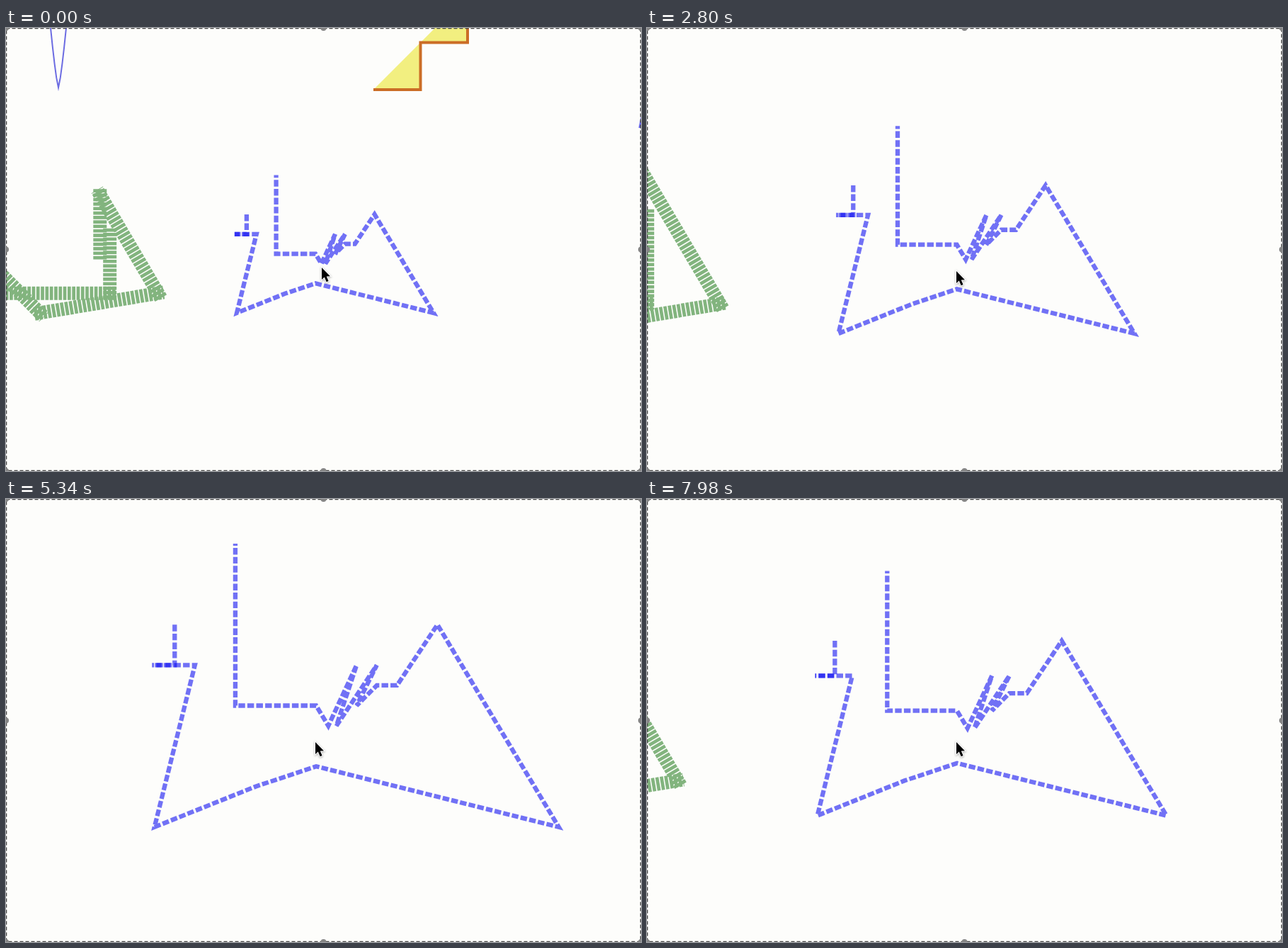
An HTML page with a canvas for the animation above (8000 ms loop, 897x625 px).

```html
<!DOCTYPE html>
<html>
<head>
<meta charset="utf-8">
<style>
html, body { margin: 0; width: 100%; height: 100%; overflow: hidden; background: #fdfdfb; }
canvas { display: block; }
</style>
</head>
<body>
<canvas id="stage" width="897" height="625"></canvas>
<script>
const W = 897, H = 625, LOOP = 8000;
const ctx = document.getElementById('stage').getContext('2d');
const center = { x: 436.3, y: 344.3 };

// Size of one map unit in pixels: [ms, size]
const UNIT = 13.9;
const zoomKeys = [
  [840, UNIT], [2260, 18.35], [3380, 23.65], [4360, 24.3], [5340, 28.55], [6460, 31.4], [7980, 24.65]
];

// Lines in map units; the blue one doubles back where its two parts meet
const blueStart = [[1, 10], [1, 8], [0, 8]];
const blueRest = [
  [0, 8], [2, 8], [0, 0], [5, 2], [8, 3], [20, 0], [14, 10], [12, 7], [11, 7],
  [10, 6], [11, 8], [9, 5], [10, 8], [8.6, 5], [8, 6], [4, 6], [4, 14]
];
const greenLines = [
  [[-25, 5], [-20, 0], [-8, 2], [-13.9, 12], [-13.9, 6]],
  [[-12.9, 8], [-12.9, 2], [-25, 2]]
];

let scale = 1;

function sample(keys, t) {
  const next = keys.findIndex(key => key[0] >= t);
  if (next < 1) return next ? keys.at(-1)[1] : keys[0][1];
  const [t0, a] = keys[next - 1], [t1, b] = keys[next];
  return a + (b - a) * (t - t0) / (t1 - t0);
}

// Unzoomed pixels to screen, and map units to screen
const zoom = (x, y) => [center.x + (x - center.x) * scale, center.y + (y - center.y) * scale];
const fromMap = ([x, y]) => zoom(326 + x * UNIT, 402 - y * UNIT);

function trace(points) {
  ctx.beginPath();
  points.forEach(p => ctx.lineTo(...p));
}

function stroke(points, color, width, dash = [], offset = 0) {
  trace(points);
  ctx.strokeStyle = color;
  ctx.lineWidth = width;
  ctx.setLineDash(dash);
  ctx.lineDashOffset = offset;
  ctx.stroke();
}

function extend(a, b, by) {
  const angle = Math.atan2(b[1] - a[1], b[0] - a[0]);
  const dx = by * Math.cos(angle), dy = by * Math.sin(angle);
  return [[a[0] - dx, a[1] - dy], [b[0] + dx, b[1] + dy]];
}

function drawGreen() {
  for (const line of greenLines) {
    const points = line.map(fromMap);
    for (let i = 1; i < points.length; i++) {
      stroke(extend(points[i - 1], points[i], 8), 'rgb(130,180,126)', 19, [4.7, 1.6]);
    }
  }
}

// Two strokes, so that the doubled part darkens
function drawBlue() {
  const color = 'rgba(4,4,240,0.56)', width = 6.3, dash = [9.45, 3.15];
  const start = blueStart.map(fromMap), rest = blueRest.map(fromMap);
  const reach = width / 2;
  start.at(-1)[0] -= reach;
  rest[0][0] -= reach;
  ctx.miterLimit = 3;
  stroke(start, color, width, dash);
  stroke(rest, color, width, dash, 3 * UNIT * scale - reach);
}

function drawStairs() {
  const step = 66.5;
  const at = (i, j) => zoom(519 + i * step, 87 - j * step);
  const stairs = [];
  for (let i = 0; i < 3; i++) {
    trace([at(i, i), at(i + 1, i), at(i + 1, i + 1)]);
    ctx.fillStyle = '#f2ef80';
    ctx.fill();
    stairs.push(at(i, i), at(i + 1, i));
  }
  stroke(stairs, '#cb6d26', 4);
}

function drawCurve() {
  const points = [];
  for (let d = -1; d <= 1; d += 0.25) {
    points.push(zoom(74 + 11 * d, 84 * (1 - Math.abs(d) ** 1.3)));
  }
  stroke(points, '#6c6ce2', 2);
  stroke([zoom(899, 122), zoom(895, 141)], '#6c6cf0', 3);
}

function drawFrame() {
  ctx.strokeStyle = '#4a4a4a';
  ctx.lineWidth = 1.5;
  ctx.lineDashOffset = 0;
  ctx.setLineDash([5, 3]);
  ctx.strokeRect(0.5, 0.5, W - 1, H - 1);
  ctx.fillStyle = '#858585';
  for (const x of [0, W / 2, W]) {
    for (const y of [0, H / 2, H]) {
      if (x === W / 2 && y === H / 2) continue;
      ctx.beginPath();
      ctx.arc(x, y, 4, 0, 7);
      ctx.fill();
    }
  }
}

function drawPointer(x, y) {
  ctx.save();
  ctx.translate(x, y);
  trace([[0, 0], [0, 17], [3.8, 13.6], [6.7, 20.2], [9.6, 19], [6.8, 12.4], [12, 12.2]]);
  ctx.closePath();
  ctx.setLineDash([]);
  ctx.strokeStyle = '#fff';
  ctx.lineWidth = 2;
  ctx.shadowColor = 'rgba(0,0,0,0.35)';
  ctx.shadowBlur = 3;
  ctx.shadowOffsetY = 1;
  ctx.stroke();
  ctx.shadowColor = 'transparent';
  ctx.fillStyle = '#000';
  ctx.fill();
  ctx.restore();
}

function draw(now) {
  const t = now % LOOP;
  scale = sample(zoomKeys, t) / UNIT;
  ctx.fillStyle = '#fdfdfb';
  ctx.fillRect(0, 0, W, H);
  drawStairs();
  drawCurve();
  drawGreen();
  drawBlue();
  drawFrame();
  const arrive = Math.min(1, t / 820);
  drawPointer(446 - 9 * arrive, 338 + 5 * arrive);
  requestAnimationFrame(draw);
}
requestAnimationFrame(draw);
</script>
</body>
</html>
```
